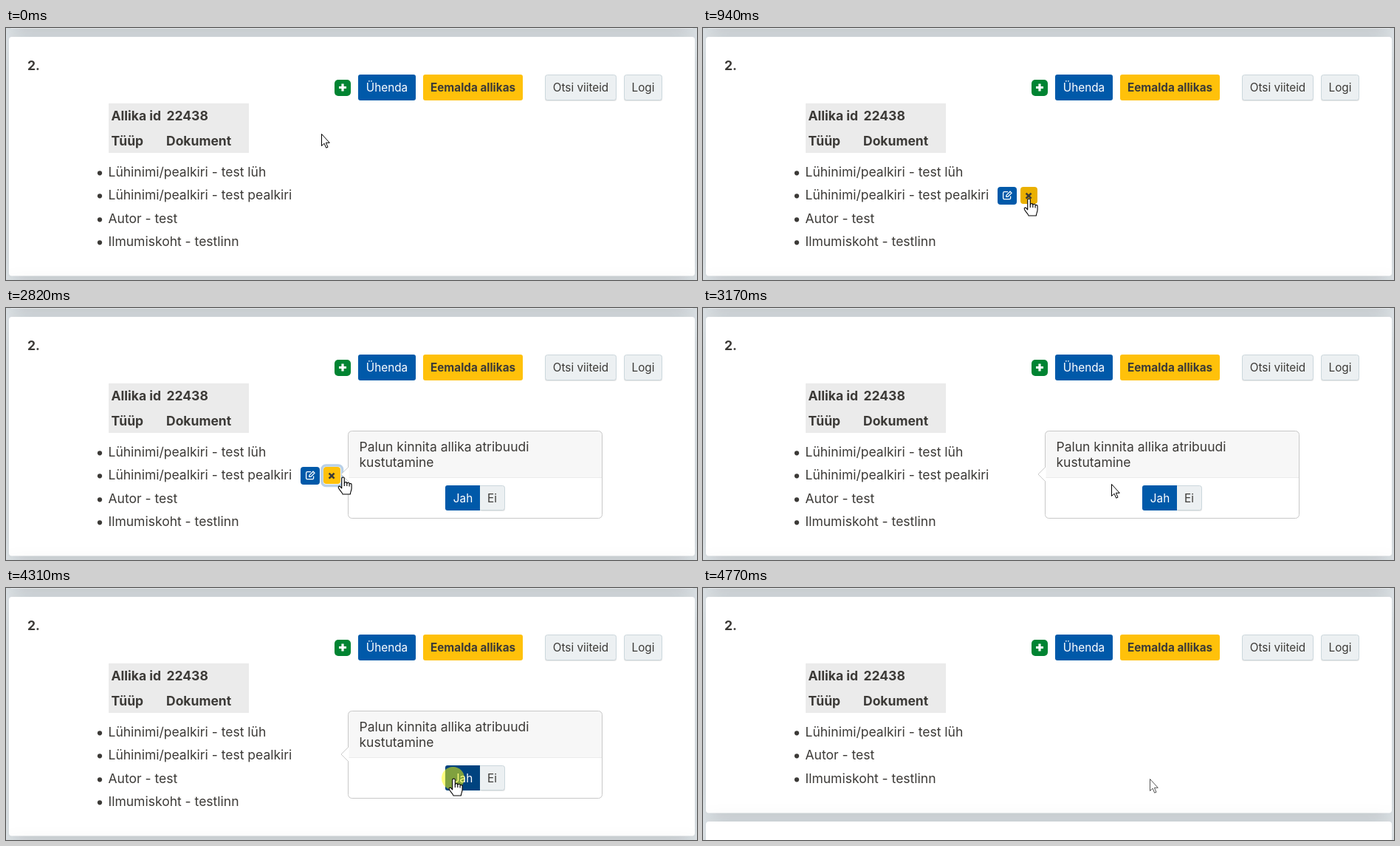
Recreate the animation shown at these times as an HTML page. Size 936x341 px, loop 5710 ms.

```html
<!DOCTYPE html>
<html lang="et">
<head>
<meta charset="utf-8">
<title>Allika atribuudi kustutamine</title>
<style>
  html, body { margin: 0; width: 100%; height: 100%; overflow: hidden; background: #e4eaee; }
  svg { display: block; width: 936px; height: 341px; }
  text { font: 17.5px Inter, "Liberation Sans", sans-serif; font-optical-sizing: none; fill: #3c3a37; white-space: pre; }
  .bold { font-weight: 700; }
  .btn { font-size: 15.3px; text-anchor: middle; }
  .light { fill: #fff; }
  .card { fill: #fff; filter: drop-shadow(0 8px 16px rgba(0, 0, 0, .15)); }
  .blue { fill: #0059a9; }
  .yellow { fill: #ffc10a; }
  .grey { fill: #ecf0f2; stroke: #cbd7dc; }
</style>
</head>
<body>
<svg viewBox="0 0 936 341">
  <rect width="936" height="341" fill="#e4eaee"/>
  <rect class="card" x="4" y="-300" width="929" height="300.5" rx="4"/>
  <rect class="card" id="card" x="4" y="12" width="929" height="323.5" rx="4"/>
  <rect class="card" id="next" x="4" y="347" width="929" height="300" rx="4"/>

  <text class="bold" x="29" y="57">2.</text>
  <rect x="445" y="70" width="22" height="22" rx="5" fill="#008432"/>
  <path d="M456 75.5v10M451 80.5h10" stroke="#fff" stroke-width="3.2"/>
  <rect class="blue" x="477" y="63" width="78" height="35" rx="3"/>
  <text class="btn light" x="516" y="86.4">Ühenda</text>
  <rect class="yellow" x="565" y="63" width="135" height="35" rx="3"/>
  <text class="btn bold" x="632.5" y="86.4">Eemalda allikas</text>
  <rect x="730" y="64" width="97" height="35" rx="3" fill="#000" opacity=".1"/>
  <rect class="grey" x="730.5" y="63.5" width="96" height="34" rx="3"/>
  <text class="btn" x="778.5" y="86.4">Otsi viiteid</text>
  <rect x="837" y="64" width="52" height="35" rx="3" fill="#000" opacity=".1"/>
  <rect class="grey" x="837.5" y="63.5" width="51" height="34" rx="3"/>
  <text class="btn" x="863" y="86.4">Logi</text>

  <rect x="139" y="102" width="190" height="67" fill="#ebebeb"/>
  <g class="bold">
    <text class="bold" x="142.5" y="125">Allika id</text>
    <text class="bold" x="217.5" y="125">22438</text>
    <text class="bold" x="142.5" y="159">Tüüp</text>
    <text class="bold" x="217" y="159">Dokument</text>
  </g>
  <g id="list"></g>

  <g id="tools">
    <rect class="blue" x="399" y="215" width="26" height="24" rx="4"/>
    <g fill="none" stroke="#fff" stroke-width="1.3">
      <path d="M413 221.7h-4.6a1.8 1.8 0 0 0-1.8 1.8v6.4a1.8 1.8 0 0 0 1.8 1.8h6.4a1.8 1.8 0 0 0 1.8-1.8v-2.4"/>
      <path d="M410.8 228.4v-2l5.2-5.2 2 2-5.2 5.2z"/>
    </g>
    <rect id="ring" x="428" y="213" width="27.5" height="27.5" rx="5.5" fill="none" stroke="#b9d1e8" stroke-width="3.6"/>
    <rect id="remove" x="430" y="215" width="23" height="23" rx="4"/>
    <path d="M437.6 223.6l7 7m0-7l-7 7" stroke="#3c3a37" stroke-width="2.6"/>
  </g>

  <g id="popover">
    <rect x="463.5" y="166.5" width="344" height="118" rx="5" fill="#fff"/>
    <path d="M463.5 229.5V171.500a5 5 0 0 1 5-5H802.500a5 5 0 0 1 5 5V229.500z" fill="#f7f7f7"/>
    <path d="M464 229.500H807" stroke="#ebebeb"/>
    <rect x="463.5" y="166.5" width="344" height="118" rx="5" fill="none" stroke="#c8c8c8"/>
    <path d="M464.500 215L454 225l10.500 10z" fill="#fff"/>
    <path d="M463.500 215.500L454 225l9.500 9.500" fill="none" stroke="#ccc"/>
    <text x="478.5" y="194">Palun kinnita allika atribuudi</text>
    <text x="478.5" y="215">kustutamine</text>
    <rect x="642" y="241" width="34" height="34" rx="3" fill="#000" opacity=".1"/>
    <path class="grey" d="M641.500 240.500H672.500a3 3 0 0 1 3 3V270.500a3 3 0 0 1-3 3H641.500z"/>
    <path id="yes" d="M642 240H598a3 3 0 0 0-3 3V271a3 3 0 0 0 3 3H642z"/>
    <text class="btn light" x="619" y="263.4">Jah</text>
    <text class="btn" x="658.5" y="263.4">Ei</text>
  </g>

  <circle id="glow" r="15.5" fill="#ff0"/>
  <g id="cursor" fill="#fff" stroke-linejoin="round">
    <path id="arrow" d="M.5.5V16.500L4.100 13.200 6.700 19.200 9 18.200 6.400 12.300H11.300z"/>
    <g id="hand" transform="translate(1.500 0)" stroke="#000" stroke-width="1.1">
      <path d="M-1.800 1.800a1.800 1.800 0 0 1 3.600 0V8.500l.3-.6a1.600 1.600 0 0 1 3.200.6l.2-.1a1.600 1.600 0 0 1 3.100.9h.2a1.500 1.500 0 0 1 2.800.9V15c0 3-1.600 4.500-1.800 8H-.5c0-2.200-4.600-5.600-5.600-8.600-.9-2.300 1.500-3 2.600-1.500l1.700 2z"/>
      <path d="M1.800 8.500V12M5.300 8.500V12M8.600 9.500V12.500" fill="none"/>
    </g>
  </g>
</svg>
<script>
const LOOP = 5710, ROW = 31.4, REMOVED = 4770;
const $ = id => document.getElementById(id);
const set = (id, attrs) => {
  for (const name in attrs) $(id).setAttribute(name, attrs[name]);
};
const show = (id, opacity) => set(id, { opacity: Number(opacity) });

const items = ['Lühinimi/pealkiri - test lüh', 'Lühinimi/pealkiri - test pealkiri',
  'Autor - test', 'Ilmumiskoht - testlinn'];
$('list').innerHTML = items.map((label, i) => {
  const y = Math.round(201 + i * ROW);
  return `<g id="item${i}"><circle cx="127" cy="${y - 4.7}" r="3.1" fill="#3c3a37"/>` +
    `<text x="138.5" y="${y}">${label}</text></g>`;
}).join('');

// The pointer advances in evenly timed steps along each path.
const home = [427, 143], below = [443.5, 250], cross = [440, 231], confirm = [604.5, 257.5];
const moves = [
  { start: 70, end: 340, steps: 5, from: home, to: below, bow: 0,
    ease: p => Math.sin(p * Math.PI / 2) },
  { start: 670, end: 940, steps: 5, from: below, to: cross, bow: 0,
    ease: p => p * p * (3 - 2 * p) },
  { start: 2820, end: 3450, steps: 10, from: cross, to: confirm, bow: -13,
    ease: p => p + .93 * p * (1 - p) * (p - .22) }
];

function pointer(t) {
  let pos = home;
  for (const { start, end, steps, from, to, bow, ease } of moves) {
    if (t < start) break;
    const gap = (end - start) / (steps - 1);
    const step = Math.min(steps, Math.floor((t - start + 4) / gap) + 1);
    const u = ease(step / steps);
    pos = [from[0] + (to[0] - from[0]) * u,
      from[1] + (to[1] - from[1]) * u + bow * 4 * u * (1 - u)];
  }
  return pos;
}

const inside = ([x, y], left, top, right, bottom) =>
  x >= left && x <= right && y >= top && y <= bottom;

// Strength of a fade that passes through one middle step.
const fade = (t, start, middle) => t < start ? 0 : t < start + 70 ? middle : 1;

function render(t) {
  const pos = pointer(t);
  const open = t < 4440 ? fade(t, 2160, .5) : 0;
  const onRow = inside(pos, 130, 212, 459, 242);
  const onRemove = inside(pos, 430, 214, 459, 240);
  const onYes = open > 0 && inside(pos, 595, 240, 642, 274);
  const gone = t >= REMOVED;

  show('tools', onRow);
  show('ring', open);
  show('popover', open);
  set('remove', { fill: onRemove && pos[0] < 453 && open < 1 ? '#eab000' : '#ffc10a' });
  set('yes', { fill: onYes ? '#00437f' : '#0059a9' });

  const firstClick = t >= 2090 ? .5 * (1 - fade(t, 2160, .5)) : 0;
  const secondClick = t >= 4310 && t < 4440 ? .5 : 0;
  show('glow', firstClick + secondClick);
  set('glow', { cx: pos[0] + 1, cy: pos[1] });

  set('cursor', { transform: `translate(${pos.map(Math.round)})` });
  show('hand', onRemove || onYes);
  show('arrow', !(onRemove || onYes));
  set('arrow', { stroke: t >= 4440 ? '#555' : '#000' });

  show('item1', !gone);
  for (const i of [2, 3]) set('item' + i, { transform: `translate(0 ${gone ? (i === 2 ? -32 : -31) : 0})` });
  set('card', { height: gone ? 292.5 : 323.5 });
  set('next', { y: gone ? 316 : 347 });
}

const begin = performance.now();
function tick() {
  render((performance.now() - begin) % LOOP);
  requestAnimationFrame(tick);
}
tick();
</script>
</body>
</html>
```
